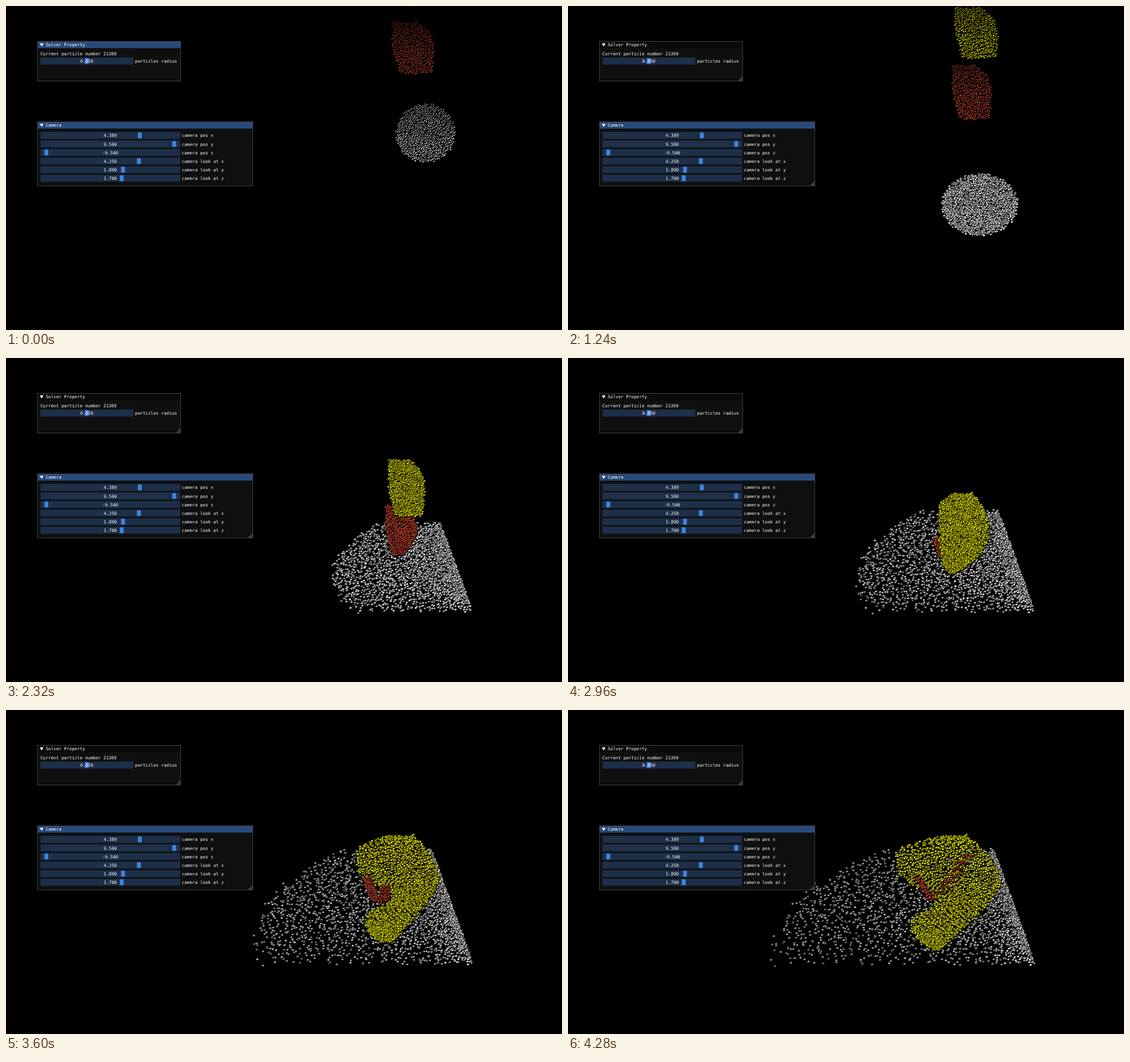
An HTML page with a canvas for the animation above (4320 ms loop, 979 by 572 pixels).

```html
<!DOCTYPE html>
<html lang="en">
<head>
<meta charset="utf-8">
<title>Particle solver</title>
<style>
  html, body { margin: 0; width: 100%; height: 100%; overflow: hidden; background: #000; }
  canvas, svg { position: absolute; left: 0; top: 0; width: 979px; height: 572px; }
  text { font: 7.68px "DejaVu Sans Mono", "Liberation Mono", monospace; fill: #fff; white-space: pre; }
  .window { fill: #0f0f0f; stroke: #434348; }
  .title { fill: #294a7a; }
  .track { fill: #1d2f49; }
  .grab { fill: #3d85e0; }
  .value { text-anchor: middle; }
  .grip { fill: #3c3c3c; visibility: hidden; }
  .live .grip { visibility: visible; }
  .live .solver .title { fill: #0a0a0a; }
</style>
</head>
<body>
<canvas id="stage" width="979" height="572"></canvas>
<svg id="ui" viewBox="0 0 979 572"></svg>
<script>
const LOOP = 4320, STEP = 40;
const ui = document.getElementById('ui');
const ctx = document.getElementById('stage').getContext('2d');

// ---- Panels ----
const rect = (cls, x, y, w, h) =>
  `<rect class="${cls}" x="${x}" y="${y}" width="${w}" height="${h}"/>`;
const label = (x, y, s, cls = '') => `<text class="${cls}" x="${x}" y="${y}">${s}</text>`;

function slider(x, y, w, grab, value, name) {
  return rect('track', x, y, w, 12.4) + rect('grab', grab, y + 1.1, 6.8, 10.2) +
    label(x + w / 2, y + 9.2, value, 'value') + label(x + w + 2.9, y + 9.2, name);
}

function panel(cls, x, y, w, h, title, body) {
  const r = x + w, b = y + h;
  return `<g class="${cls}">` + rect('window', x + .5, y + .5, w - 1, h - 1) +
    rect('title', x + 1, y + 1, w - 2, 11.4) +
    `<path fill="#fff" d="M${x + 4.5} ${y + 4}h6.6l-3.3 5.6z"/>` +
    label(x + 15, y + 9.4, title) + body +
    `<path class="grip" d="M${r - 1} ${b - 9}v8h-8z"/></g>`;
}

// Each camera slider runs from -10 to 10
const sliders = [
  [4.389, 'pos x'], [9.5, 'pos y'], [-9.5, 'pos z'],
  [4.25, 'look at x'], [1.89, 'look at y'], [1.7, 'look at z']
].map(([value, name], i) =>
  slider(60.5, 222.2 + i * 15.13, 246.2, 180.2 + value * 11.85, value.toFixed(3), 'camera ' + name)).join('');

ui.innerHTML =
  panel('solver', 55, 62, 253, 71, 'Solver Property',
    label(60.7, 87.2, 'Current particle number 21369') +
    slider(60.5, 91, 163.7, 138.9, '0.050', 'particles radius')) +
  panel('camera', 55, 204, 380, 114, 'Camera', sliders);

// ---- Easing ----
const mix = (a, b, k) => a + (b - a) * k;
const ramp = (t, from, to) => Math.min(1, Math.max(0, (t - from) / (to - from)));
const ease = (t, from, to) => {
  const k = ramp(t, from, to);
  return k * k * (3 - 2 * k);
};

// ---- Outlines: a shape maps depth k (0 top, 1 bottom) to [y, left, right] ----
const blend = (f, g, m) => k => {
  const a = f(k), b = g(k);
  return a.map((v, i) => mix(v, b[i], m));
};

const strip = (y0, l0, r0, y1, l1, r1) =>
  k => [mix(y0, y1, k), mix(l0, l1, k), mix(r0, r1, k)];

// Accelerating fall, slowed by perspective
const drop = t => {
  const s2 = (t / 1000) ** 2;
  return s2 / (.0189 + .00086 * s2);
};

// Cube seen from one corner, its size following its height on screen
function cube(top, pinch, floor) {
  const bottom = Math.min(floor, top + 88 + .06 * top);
  const left = 681.5 - .041 * top, width = 75 - .073 * top;
  return k => {
    const low = ramp(k, .5, 1), high = 1 - ramp(k, 0, .45);
    return [mix(top, bottom, k), left + width * .18 * low,
      left + width * (1 - .4 * high ** 2 - (.05 + .5 * pinch) * low ** 2)];
  };
}

function ball(t) {
  const p = ramp(t, 0, 1240);
  const cx = 738.5 - 13.5 * p, cy = 224.5 + 126.5 * p ** 1.4;
  const rx = 51.5 + 15 * p ** 5, ry = 51.5 + 3 * p;
  return k => {
    const w = rx * 2 * Math.sqrt(k * (1 - k));
    return [cy + ry * (2 * k - 1), cx - w, cx + w];
  };
}

// Wave running left along the floor, held by a slanted wall on the right
function wave(t) {
  const run = (t - 1880) / 2400, front = 598 - 237 * run;
  const top = mix(291, 246, ease(t, 2320, 3600));
  return k => {
    const y = mix(top, 448 + 3 * run, k);
    return [y, front + mix(80, 200, run) * (1 - k) ** 2.5 + mix(85, 4, run) * k ** 4,
      747 + .365 * (y - 245)];
  };
}

// Lump that spreads into a crescent with a notch on its left
function crescent(t) {
  const q = ramp(t, 2960, 4280), open = ease(t, 2960, 3600);
  const top = 240 - 18 * open, bottom = 379 + 44 * Math.sin(q * Math.PI / 2);
  return k => {
    const notch = 62 * open * Math.exp(-(((k - .57) / .13) ** 2));
    const left = 654 - 82 * q + 26 * q * k + notch +
      (26 + 70 * q) * (1 - ramp(k, 0, .17)) ** 2 + (16 + 30 * q) * k ** 8;
    const right = 740 + 22 * open - mix(28, 60, q) * (1 - ramp(k, 0, .43)) ** 2 -
      mix(58, 108, q) * ramp(k, .43, 1) ** mix(2.6, 1.25, open);
    return [mix(top, bottom, k), left, right];
  };
}

// ---- Bodies: share of particles shown, crowding to the right, lit height, shape ----
const blockLight = t => .85 + .8 * ramp(t, 0, 2400) ** 2;

function white(t) {
  return {
    share: .31 + .69 * ease(t, 500, 3500),
    crowd: 1 + 1.15 * ramp(t, 1300, 3900),
    lit: mix(1, 1.65, ease(t, 300, 1500)),
    shape: blend(ball(t), wave(t), ease(t, 1240, 1880))
  };
}

function red(t) {
  const melt = ease(t, 2200, 2960), q = ramp(t, 2960, 4280), up = ease(t, 2960, 3600);
  const patch = strip(mix(318, 296, up), 644 - 33 * q, 660 - 42 * q,
    mix(350, 337, up), 653 - 19 * q, 664 - 10 * q);
  return {
    share: mix(.8, mix(.24, .07, q), melt), crowd: 1, lit: blockLight(t),
    shape: blend(cube(29 + drop(t), ease(t, 1900, 2400), 347), patch, melt)
  };
}

function redTail(t) {
  const q = ramp(t, 3600, 4280);
  return {
    share: ramp(t, 3300, 3600) * (1 - .3 * q), crowd: 1, lit: 1.6,
    shape: strip(mix(310, 255, q), mix(660, 694, q), mix(676, 716, q),
      mix(340, 332, q), mix(656, 640, q), mix(675, 660, q))
  };
}

function yellow(t) {
  return {
    share: .32 + .68 * ease(t, 1400, 3900), crowd: 1, lit: blockLight(t),
    shape: blend(cube(1.155 * drop(t) - 84, ease(t, 2320, 2960), 379), crescent(t), ease(t, 2320, 2960))
  };
}

// ---- Particles ----
let seed = 7;
const rnd = () => (seed = seed * 16807 % 2147483647) / 2147483647;

// Depth that spreads particles evenly over a disc
function discDepth(area) {
  let lo = 0, hi = Math.PI;
  for (let i = 0; i < 18; i++) {
    const m = (lo + hi) / 2;
    if (m - Math.sin(m) * Math.cos(m) < area * Math.PI) lo = m; else hi = m;
  }
  return (1 - Math.cos(lo)) / 2;
}

function body(pose, count, rgb, round) {
  const dots = Array.from({ length: count }, (_, i) => {
    const v = (i * .569840291 + .5) % 1;
    return {
      rank: i / count, u: (i * .754877666 + .5) % 1, k: round ? discDepth(v) : v,
      jx: rnd() - .5, jy: rnd() - .5, tone: rnd()
    };
  });
  return { pose, rgb, dots: dots.sort((a, b) => a.k - b.k) };
}

const bodies = {
  white: body(white, 3000, [236, 236, 236], true),
  red: body(red, 720, [212, 72, 48]),
  redTail: body(redTail, 55, [205, 62, 40]),
  yellow: body(yellow, 1650, [232, 232, 0])
};

const TONES = 6, SIZE = 7;
const sprites = Array.from({ length: TONES }, () => {
  const c = document.createElement('canvas');
  c.width = c.height = SIZE;
  return c;
});

function paintSprites(rgb, lit) {
  sprites.forEach((c, i) => {
    const g = c.getContext('2d'), m = SIZE / 2, level = (i + 1) / TONES;
    const shade = k => `rgb(${rgb.map(x => Math.round(x * level * k))})`;
    g.clearRect(0, 0, SIZE, SIZE);
    g.fillStyle = '#000';
    g.beginPath();
    g.arc(m, m + .3, 2.6, 0, 7);
    g.fill();
    const fade = g.createLinearGradient(m - .6, m - 2, m + .6, m + 2);
    fade.addColorStop(0, shade(1));
    fade.addColorStop(.5, shade(.95));
    fade.addColorStop(1, shade(.2));
    g.fillStyle = fade;
    g.beginPath();
    g.ellipse(m, m - .2, 2.05, lit, -.55 * (1.9 - lit), 0, 7);
    g.fill();
  });
}

function drawBody({ pose, rgb, dots }, t) {
  const { share, crowd, lit, shape } = pose(t);
  const open = ramp(lit, .8, 1.6);
  paintSprites(rgb, lit);
  for (const p of dots) {
    if (p.rank >= share) continue;
    const [y, left, right] = shape(p.k);
    const loose = 2.8 + 18 * (crowd - 1) * (1 - p.u);
    const x = right - (right - left) * (1 - p.u) ** crowd + p.jx * loose;
    const far = 1 - .3 * (crowd - 1) * (1 - p.u);
    const level = mix(Math.min(1, .45 + .7 * p.k), 1, open) * mix(.55, 1, p.tone) * far;
    const sprite = sprites[Math.min(TONES - 1, Math.floor(level * TONES))];
    ctx.drawImage(sprite, Math.round(x - SIZE / 2),
      Math.round(y + p.jy * Math.min(loose, 9) - SIZE / 2));
  }
}

function frame(now) {
  const t = Math.floor(now % LOOP / STEP) * STEP;
  ui.classList.toggle('live', t >= STEP);
  ctx.fillStyle = '#000';
  ctx.fillRect(0, 0, 979, 572);
  const order = t < 3300 ? ['white', 'red', 'yellow'] : ['white', 'yellow', 'red', 'redTail'];
  order.forEach(name => drawBody(bodies[name], t));
}

const start = performance.now();
function tick() {
  frame(performance.now() - start);
  requestAnimationFrame(tick);
}
tick();
</script>
</body>
</html>
```
